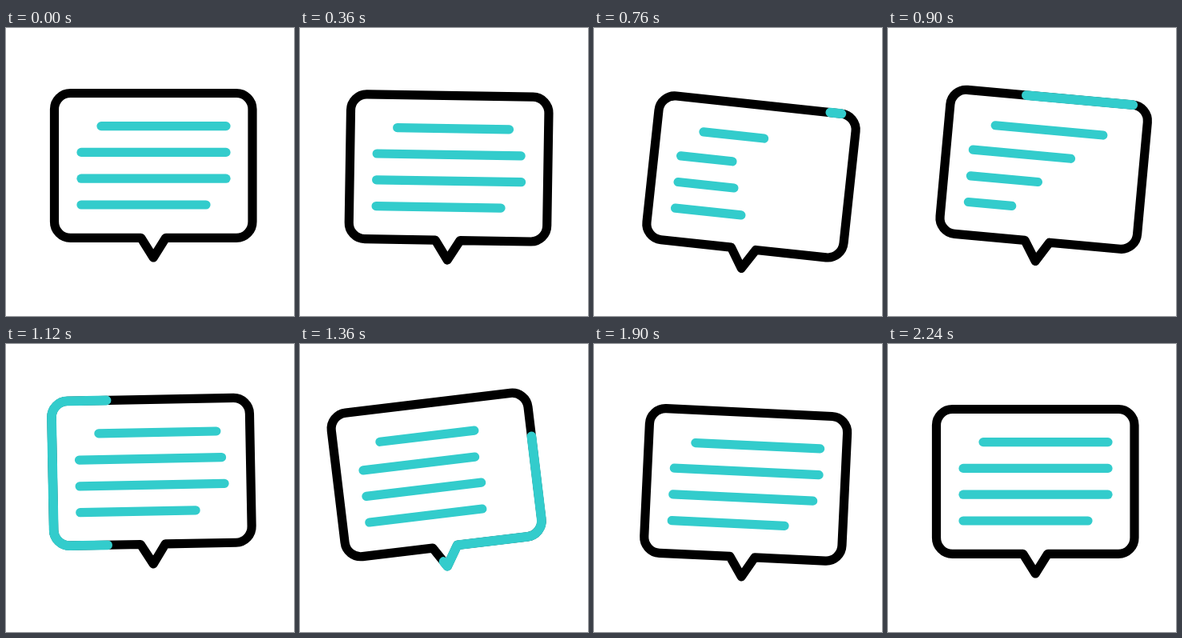
Animation, 360 px wide and 360 px high, one loop 2.4 s. Source, as an HTML page:

```html
<!DOCTYPE html>
<html>
<head>
<meta charset="utf-8">
<style>
html, body { margin: 0; width: 100%; height: 100%; overflow: hidden; background: #fff; }
svg { display: block; width: 100vw; height: 100vh; }
path { fill: none; stroke: #3cc; stroke-width: 11.2; stroke-linecap: round; stroke-linejoin: round; }
#outline { stroke: #000; }
#runner { stroke-width: 11.8; }
</style>
</head>
<body>
<svg viewBox="0 0 360 360">
  <g id="bubble">
    <path id="outline" d="M288 81.5H80.5a20 20 0 0 0 -20 20V242a20 20 0 0 0 20 20.3H168.7L184.2 287L199.7 262.3H288a20 20 0 0 0 20 -20.3V101.5a20 20 0 0 0 -20 -20z"/>
    <path id="runner" pathLength="1000"/>
  </g>
</svg>
<script>
const LOOP = 2400;
const bubble = document.getElementById('bubble');
const outline = document.getElementById('outline');
const runner = document.getElementById('runner');
runner.setAttribute('d', outline.getAttribute('d'));

// Smooth step from 0 to 1 between two times
function ease(t, from, to) {
  const u = Math.min(1, Math.max(0, (t - from) / (to - from)));
  return u * u * (3 - 2 * u);
}

// Rises from 0 to 1 and falls back to 0
const pulse = (t, start, peak, end) => ease(t, start, peak) - ease(t, peak, end);

// Text lines: left end, right end, share lost in the second shrink
const lines = [[119, 275, 0.24], [94, 275, 0.27], [94, 275, 0.35], [94, 250, 0.27]]
  .map(([left, right, dip]) => {
    const path = document.createElementNS(bubble.namespaceURI, 'path');
    return { left, right, dip, path: bubble.appendChild(path) };
  });

function draw(t) {
  // The bubble swings around the tip of its tail
  const tilt = 6.2 * pulse(t, 220, 800, 1400)
    - 7 * pulse(t, 800, 1400, 1820)
    + 3 * pulse(t, 1400, 1820, 2240);
  const rise = 14.5 * pulse(t, 220, 700, 1200)
    - 14 * pulse(t, 700, 1200, 1700)
    + 5.6 * pulse(t, 1200, 1700, 2240);
  bubble.setAttribute('transform', `translate(0 ${rise}) rotate(${tilt} 184 287)`);

  // A teal stretch runs once around the outline
  const head = 1000 * ease(t, 700, 1500);
  const rear = 1000 * ease(t, 900, 1700);
  runner.style.display = head - rear > 0.01 ? '' : 'none';
  runner.setAttribute('stroke-dasharray', `${head - rear} 2000`);
  runner.setAttribute('stroke-dashoffset', -rear);

  // The lines shrink twice, one after another
  lines.forEach(({ left, right, dip, path }, i) => {
    const full = 1000 + 60 * i;
    const lost = 0.65 * pulse(t, 260 + 80 * i, 660 + 80 * i, full)
      + dip * pulse(t, full, 1380 + 90 * i, 1800 + 90 * i);
    path.setAttribute('d', `M${left} ${122.6 + 32.8 * i}h${(right - left) * (1 - lost)}`);
  });
}

const start = performance.now();
function frame() {
  draw((performance.now() - start) % LOOP);
  requestAnimationFrame(frame);
}
frame();
</script>
</body>
</html>
```
